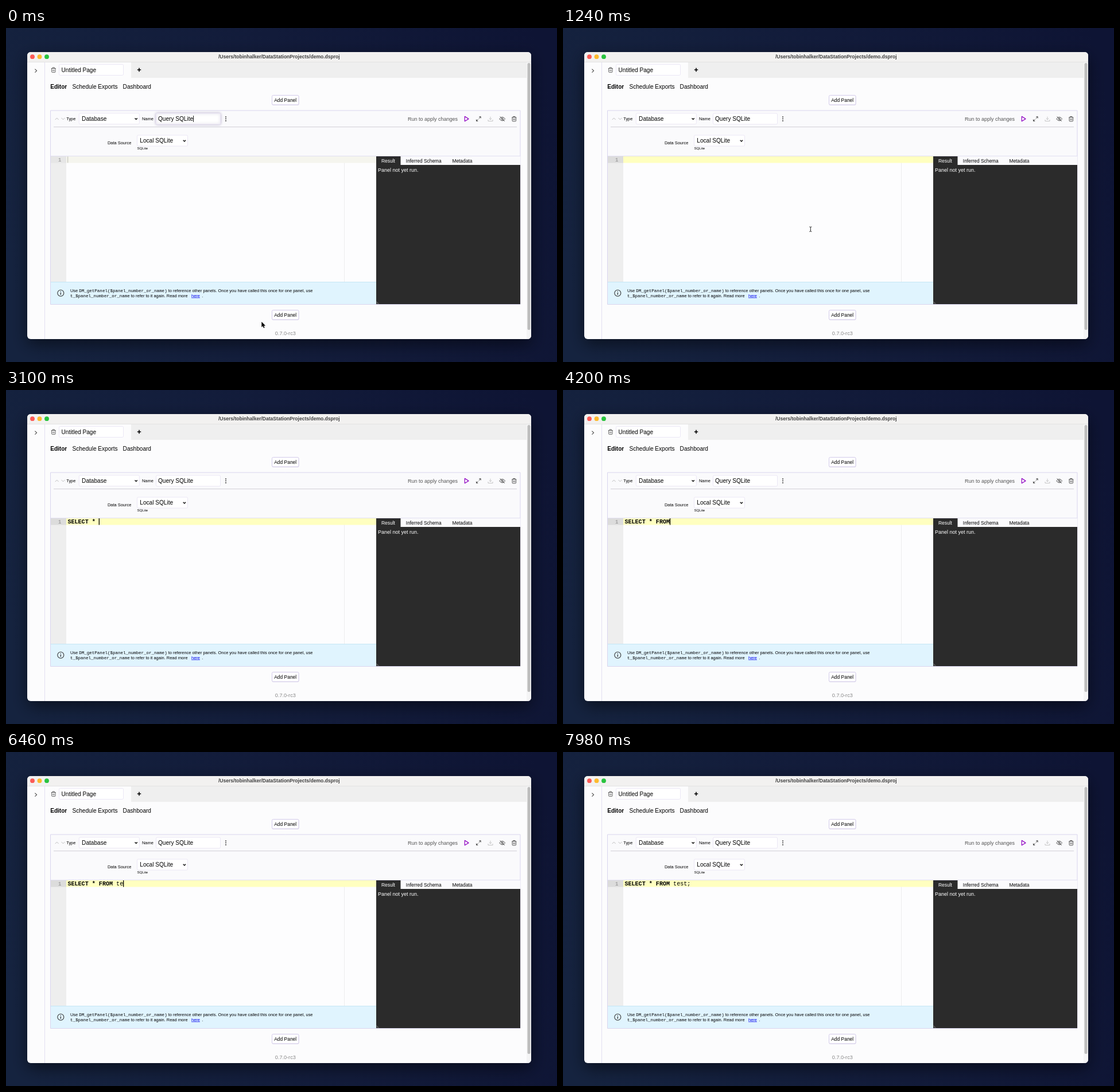
An HTML page with a canvas for the animation above (8000 ms loop, 960x583 px).

```html
<!DOCTYPE html>
<html lang="en">
<head>
<meta charset="utf-8">
<title>Query editor</title>
<style>
html, body { margin: 0; width: 100%; height: 100%; overflow: hidden; background: #121b38; }
canvas { display: block; width: 960px; height: 583px; }
</style>
</head>
<body>
<canvas id="stage" width="960" height="583"></canvas>
<script>
const ctx = document.getElementById('stage').getContext('2d');
const SANS = '"Liberation Sans", Arial, sans-serif';
const MONO = '"Liberation Mono", "Courier New", monospace';
const LOOP = 8000;
const CLICK = 440;
const QUERY = 'SELECT * FROM test;';
const KEYS = [1500, 1700, 1920, 2080, 2240, 2420, 2600, 2800, 2960,
  3500, 3680, 3860, 4020, 4300, 6180, 6360, 6560, 6740, 7120];
const CHAR = 6.05;

function rect(x, y, w, h, fill) {
  ctx.fillStyle = fill;
  ctx.fillRect(x, y, w, h);
}

function box(x, y, w, h, r, fill, stroke) {
  ctx.beginPath();
  ctx.roundRect(x, y, w, h, r);
  if (fill) { ctx.fillStyle = fill; ctx.fill(); }
  if (stroke) { ctx.lineWidth = 1; ctx.strokeStyle = stroke; ctx.stroke(); }
}

// y is the vertical middle of the capitals
function text(str, x, y, size, color = '#000', { bold, mono, align = 'left' } = {}) {
  ctx.font = `${bold ? 'bold ' : ''}${size}px ${mono ? MONO : SANS}`;
  ctx.textAlign = align;
  ctx.fillStyle = color;
  ctx.fillText(str, x, y + size * 0.35);
  return x + ctx.measureText(str).width;
}

function dot(x, y, r, fill) {
  ctx.beginPath();
  ctx.arc(x, y, r, 0, Math.PI * 2);
  ctx.fillStyle = fill;
  ctx.fill();
}

// An SVG path drawn around (x, y)
function icon(path, x, y, stroke, width = 1, fill) {
  ctx.save();
  ctx.translate(x, y);
  const p = new Path2D(path);
  if (fill) { ctx.fillStyle = fill; ctx.fill(p); }
  if (stroke) {
    ctx.strokeStyle = stroke;
    ctx.lineWidth = width;
    ctx.lineJoin = 'round';
    ctx.stroke(p);
  }
  ctx.restore();
}

const TRASH = 'M-4-2.7H4 M-1.6-2.7V-4.2H1.6V-2.7 M-3.2-2.7V3.2Q-3.2 4.2-2.2 4.2H2.2Q3.2 4.2 3.2 3.2V-2.7 M-1-.6V2.3 M1-.6V2.3';
const EXPAND = 'M-3.8 3.8L-.7.7 M.7-.7L3.8-3.8 M1-3.8H3.8V-1 M-3.8 1V3.8H-1';
const DOWNLOAD = 'M-4 1.2V3.8H4V1.2 M0-4V1.2 M-2.2-1L0 1.2L2.2-1';
const EYE = 'M-5 0Q0-6.4 5 0Q0 6.4-5 0Z M-1.6 0A1.6 1.6 0 1 0 1.6 0A1.6 1.6 0 1 0-1.6 0 M-4-4.2L4 4.2';
const ARROW = 'M0 0V9.6L2.2 7.6L3.7 11L5.3 10.3L3.8 7H6.8Z';
const IBEAM = 'M-2-4.2Q0-4.2 0-3Q0-4.2 2-4.2 M0-3V3 M-2 4.2Q0 4.2 0 3Q0 4.2 2 4.2';

function drawBackdrop() {
  const g = ctx.createLinearGradient(0, 400, 960, 160);
  g.addColorStop(0, '#15233f');
  g.addColorStop(0.55, '#121b3a');
  g.addColorStop(1, '#0e1434');
  rect(0, 0, 960, 583, g);
  ctx.save();
  ctx.shadowColor = 'rgba(0,0,0,.5)';
  ctx.shadowBlur = 28;
  ctx.shadowOffsetY = 9;
  box(37, 42, 878, 501, 6, '#fcfcfd');
  ctx.restore();
}

function drawChrome() {
  rect(37, 42, 878, 17, '#f2f1f0');
  rect(37, 59, 878, 0.7, '#d9d8d8');
  ['#fc5b57', '#fdbb2e', '#29c43f'].forEach((c, i) => dot(46 + i * 12.5, 50.2, 3.9, c));
  text('/Users/tobinhalker/DataStationProjects/demo.dsproj', 475.8, 50, 8.55, '#414141',
    { bold: true, align: 'center' });

  rect(67, 60, 1, 483, '#e3dff1');
  icon('M-1.6-3L1.6 0L-1.6 3', 52, 74.7, '#444', 1.1);
  rect(218, 60, 689, 27, '#efefef');
  icon(TRASH, 82.8, 73.2, '#555', 0.9);
  box(92.5, 63.5, 112, 19, 2, '#fff', '#ebe7f5');
  text('Untitled Page', 96.5, 73, 10.1);
  icon('M-3.2 0H3.2 M0-3.2V3.2', 232, 73, '#000', 1.6);

  rect(907, 60, 8, 483, '#f5f5f6');
  box(908.5, 61, 5, 466, 2.5, '#bdbdbd');

  text('Editor', 77.3, 102, 10, '#000', { bold: true });
  text('Schedule Exports', 115.4, 102, 10.1);
  text('Dashboard', 203.6, 102, 10.1);
  addButton(117);
  addButton(492);
  text('0.7.0-rc3', 486.8, 533, 9.1, '#888', { align: 'center' });
}

function addButton(y) {
  box(463.5, y + 1, 47, 17, 2, '#e4e0ee');
  box(463.5, y + 0.5, 46.5, 16.5, 2, '#fff', '#d3cbea');
  text('Add Panel', 486.7, y + 8.8, 8.45, '#000', { align: 'center' });
}

function select(label, x, y, w) {
  box(x, y - 9.5, w, 19, 2, '#fff', '#ebe7f5');
  text(label, x + 4.8, y, 10.1);
  icon('M-2.2-1.1L0 1.1L2.2-1.1', x + w - 5.6, y + 0.2, '#111', 1.4);
}

function drawPanel(nameFocus) {
  box(77.5, 144, 818.5, 338.5, 0, '#fafafc', '#d9d5ee');
  icon('M-3 1.6L0-1.4L3 1.6', 88.7, 158.5, '#b5b5b5', 0.9);
  icon('M-3-1.6L0 1.4L3-1.6', 99.5, 158.5, '#b5b5b5', 0.9);
  text('Type', 105.3, 158.5, 7.4);
  select('Database', 127.3, 158.3, 105);
  text('Name', 237, 158.5, 7.45);
  ctx.save();
  if (nameFocus) {
    ctx.shadowColor = 'rgba(110,90,150,.45)';
    ctx.shadowBlur = 4;
  }
  box(261.5, 149, 112, 19, 2, '#fff', '#ebe7f5');
  ctx.restore();
  const end = text('Query SQLite', 265, 158.3, 10.1);
  if (nameFocus) rect(end, 153, 0.9, 11, '#000');
  [-3.3, 0, 3.3].forEach(d => dot(383, 158.6 + d, 1, '#333'));

  text('Run to apply changes', 700, 158.6, 9, '#555');
  icon('M-3-4.2V4.2L3.7 0Z', 802.3, 158.6, '#9410c4', 1.3, '#fff');
  icon(EXPAND, 823.3, 158.6, '#444', 1);
  icon(DOWNLOAD, 844, 158.8, '#c4c4c4', 1);
  icon(EYE, 864.7, 158.7, '#444', 0.9);
  icon(TRASH, 885.3, 158.7, '#444', 0.9);
  rect(83, 172.3, 807, 0.9, '#cbc9d2');

  text('Data Source', 177, 200.3, 7.45);
  select('Local SQLite', 228.5, 196.6, 88);
  text('SQLite', 228.4, 209.8, 6.2);
  rect(78, 223, 818, 0.8, '#dddaf0');
}

function drawResult() {
  rect(645, 224, 251, 15, '#fafafc');
  rect(645, 224, 42.5, 16, '#2b2b2b');
  rect(645, 239, 251, 243, '#2b2b2b');
  text('Result', 654, 231.6, 8.45, '#fff');
  text('Inferred Schema', 696.8, 231.6, 8.4);
  text('Metadata', 777.4, 231.6, 8.4);
  text('Panel not yet run.', 648, 247.8, 9, '#fff');
  icon('M0 0L2 2 M0-2L4 2', 645.5, 479.5, '#aaa', 0.6);
}

function drawInfo() {
  rect(78, 443, 567, 39, '#e0f4fe');
  rect(78, 443, 567, 0.8, '#bfe3f3');
  ctx.beginPath();
  ctx.arc(95.3, 462.7, 5.5, 0, Math.PI * 2);
  ctx.strokeStyle = '#333';
  ctx.lineWidth = 1.1;
  ctx.stroke();
  rect(94.7, 462, 1.2, 3.7, '#222');
  rect(94.7, 459.6, 1.2, 1.3, '#222');

  const mono = { mono: true };
  let x = text('Use ', 112, 458.5, 7.45);
  x = text('DM_getPanel($panel_number_or_name)', x, 458.8, 7.53, '#000', mono);
  text(' to reference other panels. Once you have called this once for one panel, use', x, 458.5, 7.45);
  x = text('t_$panel_number_or_name', 112, 467.6, 7.53, '#000', mono);
  text(' to refer to it again. Read more', x, 467.3, 7.45);
  x = text('here', 323, 467.3, 7.45, '#0000ee');
  rect(323, 470.6, x - 323, 0.7, '#0000ee');
  text('.', 341.3, 467.3, 7.45);
}

function drawEditor(t) {
  const focused = t >= CLICK;
  rect(78, 224, 567, 219, '#fdfdfe');
  rect(78, 224, 27, 219, '#eeeeee');
  rect(589, 224, 0.8, 219, '#e9e9ea');
  rect(78, 224, 27, 11.5, focused ? '#dcdcdc' : '#e6e6e6');
  rect(105, 224, 540, 11.5, focused ? '#ffffc0' : '#f5f5ee');
  text('1', 96.5, 229.7, 9.5, '#8a8a8a', { mono: true, align: 'right' });

  const count = KEYS.filter(k => k <= t).length;
  let col = 0;
  for (const part of QUERY.slice(0, count).split(/( )/)) {
    const bold = ['SELECT', '*', 'FROM'].includes(part);
    text(part, 107.4 + col * CHAR, 229.7, 10.08, '#000', { mono: true, bold });
    col += part.length;
  }

  const x = 107.2 + count * CHAR;
  if (!focused) {
    rect(x, 224.3, 1, 11, '#bdbdb6');
    return;
  }
  const since = t - (count ? KEYS[count - 1] : CLICK);
  if (since % 1000 < 500) rect(x, 224, 1.3, 11.5, '#000');
}

function drawPointer(t) {
  if (t >= KEYS[0]) return;
  const p = Math.min(1, Math.max(0, (t - 40) / 360));
  const e = p * p * (3 - 2 * p);
  const x = 445.3 - 14 * e;
  const y = 512.7 - 161.5 * e;
  if (y > 443) {
    icon(ARROW, x, y, '#fff', 1.4);
    icon(ARROW, x, y, null, 1, '#000');
  } else {
    icon(IBEAM, x, y, '#fff', 2);
    icon(IBEAM, x, y, '#222', 1);
  }
}

function draw(t) {
  drawBackdrop();
  ctx.save();
  ctx.beginPath();
  ctx.roundRect(37, 42, 878, 501, 6);
  ctx.clip();
  drawChrome();
  drawPanel(t < CLICK);
  drawEditor(t);
  drawInfo();
  drawResult();
  drawPointer(t);
  ctx.restore();
}

const start = performance.now();
function tick() {
  draw((performance.now() - start) % LOOP);
  requestAnimationFrame(tick);
}
tick();
</script>
</body>
</html>
```
